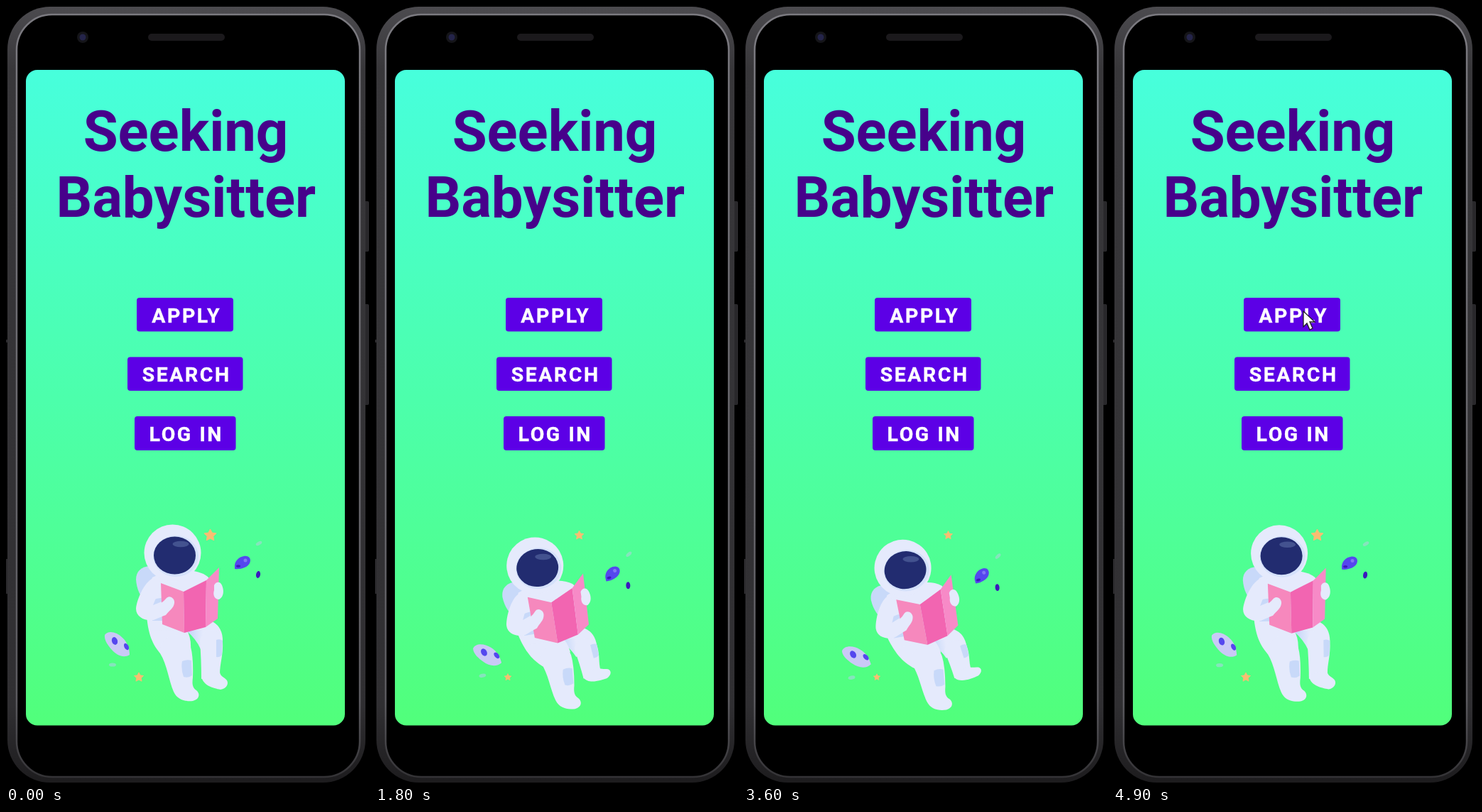
An HTML page that plays this animation: 511x1096 px, repeating every 5000 ms.

```html
<!DOCTYPE html>
<html lang="en">
<head>
<meta charset="utf-8">
<title>Seeking Babysitter</title>
<style>
  html, body { margin: 0; width: 100%; height: 100%; overflow: hidden; background: #000; }
  svg { display: block; width: 100vw; height: 100vh; }
  text { font-family: Roboto, sans-serif; font-weight: 700; text-anchor: middle; }
  .title { font-size: 79.6px; fill: #47018b; }
  .button rect { fill: #5c00e6; }
  .button text { font-size: 28.4px; letter-spacing: 2.6px; fill: #fff; stroke: #fff; stroke-width: .4px; }
  .suit { fill: #e5eafc; }
  .shade { fill: #c8d9f9; }
  .gold { fill: #f9bd72; }
  .violet { fill: #5547ee; }
  .deep { fill: #3c17bd; }
  .mist { fill: #86e4bd; }
</style>
</head>
<body>
<svg viewBox="0 0 511 1096" preserveAspectRatio="none">
  <defs>
    <linearGradient id="screen" x2="0" y2="1">
      <stop stop-color="#47ffdc"/>
      <stop offset="1" stop-color="#51ff7b"/>
    </linearGradient>
    <linearGradient id="rim" x2="0" y2="1">
      <stop stop-color="#4c4b4f"/>
      <stop offset=".08" stop-color="#38373a"/>
      <stop offset=".9" stop-color="#302f32"/>
      <stop offset="1" stop-color="#1d1c1e"/>
    </linearGradient>
    <linearGradient id="glow" x2="0" y2="1">
      <stop stop-color="#7b7a80"/>
      <stop offset=".9" stop-color="#5b5a5f"/>
      <stop offset="1" stop-color="#343336"/>
    </linearGradient>
    <linearGradient id="thighFill">
      <stop offset=".1" stop-color="#c8d9f9"/>
      <stop offset=".45" stop-color="#e5eafc"/>
    </linearGradient>
    <path id="star" d="M0-9L2.8-3.6 9-2.7 4.5 1.7 5.5 7.7 0 4.9-5.5 7.7-4.5 1.7-9-2.7-2.8-3.6Z"
      stroke="#f9bd72" stroke-linejoin="round"/>
  </defs>

  <!-- phone -->
  <g fill="#29282b">
    <rect x="504" y="275" width="7" height="71" rx="2"/>
    <rect x="504" y="420" width="7" height="142" rx="2"/>
    <rect x="0" y="470" width="4" height="4"/>
    <rect x="0" y="779" width="4" height="49"/>
  </g>
  <rect x="2" y="1" width="504" height="1093" rx="60" fill="url(#rim)"/>
  <rect x="15" y="12" width="483" height="1074" rx="50" fill="#000" stroke="url(#glow)" stroke-width="2.5"/>
  <circle cx="108" cy="44" r="8" fill="#151519"/>
  <circle cx="108" cy="44" r="4.5" fill="#24244a"/>
  <rect x="200" y="39" width="108" height="10" rx="5" fill="#1b191c"/>
  <rect x="28" y="90" width="449" height="923.5" rx="16" fill="url(#screen)"/>

  <text class="title" x="253" y="204">Seeking</text>
  <text class="title" x="253.3" y="297.2">Babysitter</text>
  <g class="button">
    <rect x="184" y="411" width="136" height="47.5" rx="4"/>
    <text x="254.2" y="446">APPLY</text>
    <rect x="171" y="494.5" width="162.5" height="47.5" rx="4"/>
    <text x="254.2" y="529.4">SEARCH</text>
    <rect x="181" y="578" width="142.5" height="48" rx="4"/>
    <text x="253.8" y="613">LOG IN</text>
  </g>

  <!-- floating bits -->
  <g transform="translate(287.5 745.5)"><use class="twinkle gold" href="#star"/></g>
  <g transform="translate(187 945.5) scale(.78)"><use class="twinkle gold" href="#star"/></g>
  <g transform="translate(156 899)"><g class="drift">
    <path fill="#cac9f6" d="M-17-13C-12-20 0-17 8-9C15-3 18 8 18 15C10 20 0 16-7 8C-12 2-18-5-17-13Z"/>
    <ellipse class="violet" cx="-3" cy="-4.5" rx="4" ry="5.5" transform="rotate(-18 -3 -4.5)"/>
    <ellipse class="violet" cx="13.5" cy="3.5" rx="3" ry="5" transform="rotate(-28 13.5 3.5)"/>
  </g></g>
  <g transform="translate(333 784)"><g class="drift">
    <path class="violet" d="M-11 7C-12-1-6-8 2-9C9-10 13-5 10 1C7 7-3 10-11 9Z"/>
    <circle cx="4" cy="-3" r="2.5" fill="#8177f5"/>
    <ellipse class="deep" cx="-6" cy="5" rx="3" ry="1.8"/>
  </g></g>
  <g transform="translate(356 757)"><g class="drift">
    <ellipse class="mist" rx="4.7" ry="2.4" transform="rotate(-30)"/>
  </g></g>
  <g transform="translate(150 928)"><g class="drift">
    <ellipse class="mist" rx="5" ry="2.6"/>
  </g></g>
  <g transform="translate(355 801)"><g class="drift">
    <ellipse class="deep" rx="3" ry="5" transform="rotate(10)"/>
  </g></g>

  <!-- astronaut -->
  <g id="body">
    <path fill="url(#thighFill)" d="M254 880L270 860 292 868Q305 876 305 894L274 906Q268 892 254 880Z"/>
    <g id="farShin">
      <path class="suit" d="M273 896Q275 920 275 948L301 942C301 925 306 915 305 895A16 16 0 0 0 273 896Z"/>
      <path class="shade" d="M296 893Q301 891 305 894L304 914Q301 918 296 917Z"/>
      <path id="farFoot" class="suit" d="M275 942C275 957 292 961 302 963C310 962 314 955 311 950C307 945 300 944 301 936Z"/>
    </g>
    <g id="thigh">
      <path class="suit" d="M198 858C200 885 206 899 217 912L260 905Q261 890 254 878L232 858Z"/>
      <g id="shin">
        <path class="suit" d="M217 912C227 928 229 950 236 966C241 977 251 980 263 979C272 977 274 969 268 964C262 960 262 954 263 946Q264 918 260 903A22 22 0 0 0 217 912Z"/>
        <path class="shade" d="M248 923Q255 920 261 922L262 943Q257 947 250 945Q246 934 248 923Z"/>
      </g>
    </g>
    <path class="shade" d="M210 790C193 787 183 795 183 808C184 822 189 832 198 841L220 812Z"/>
    <path class="suit" d="M206 805C224 796 266 789 284 804Q294 814 291 832L282 879 204 880Q199 858 201 820Z"/>
    <path class="shade" d="M204 838Q212 834 219 834L221 866 206 866Z"/>
    <path class="suit" d="M207 806C194 812 184 837 183 849C183 861 196 867 208 865L224 858 222 838 207 844 219 815Z"/>
    <path fill="#f688bd" d="M218 813L250 825 251 883 220 871Z"/>
    <path fill="#f265b1" d="M250 825L282 809 281 875 251 883Z"/>
    <path fill="#f78ac7" d="M282 809L300 791 298 863 281 875Z"/>
    <path class="shade" d="M219 844Q229 838 231 846L226 856 219 860Z"/>
    <path class="suit" d="M217 842Q223 838 226 834C231 829 238 835 237 841C236 849 229 852 225 858L214 862Z"/>
    <path class="suit" d="M293 816C296 810 302 811 304 816C307 823 307 832 300 836C293 836 291 829 293 823Z"/>
    <circle class="suit" cx="234.5" cy="770.5" r="40"/>
    <ellipse cx="239" cy="775" rx="32" ry="29" fill="#d5e1fb"/>
    <ellipse cx="237.5" cy="774" rx="29.5" ry="26.5" fill="#222c70"/>
    <ellipse id="glint" cx="246" cy="758" rx="11.5" ry="4.2" fill="#43528f"/>
  </g>

  <path id="cursor" d="M268 430V452L273 447 277 456 281 454 277 445H284Z" fill="#fff" stroke="#222" stroke-width="1.3"/>
</svg>
<script>
const LOOP = 5000, STEP = 100, TOP_AT = 300, CURSOR_AT = 4900;
const $ = id => document.getElementById(id);
const transform = (el, value) => el.setAttribute('transform', value);
const drifters = document.querySelectorAll('.drift');
const stars = document.querySelectorAll('.twinkle');

// turn a part about its joint, optionally foreshortening it
function bend(id, angle, x, y, length = 1) {
  transform($(id), `translate(${x} ${y}) rotate(${angle}) scale(1 ${length}) translate(${-x} ${-y})`);
}

function pose(time) {
  // one smooth fall and rise per loop, slightly past 0 and 1 at the ends
  const q = 0.5 - 0.538 * Math.cos((time - TOP_AT) / LOOP * 2 * Math.PI);

  transform($('body'), `translate(${-14 * q} ${27 * q}) rotate(${-12 * q} 234 770)`);
  bend('glint', 12 * q, 234, 770);
  bend('thigh', -16 * q, 225, 865);
  bend('shin', 25 * q, 238, 905);
  bend('farShin', -10 * q, 289, 893, 1 - 0.32 * q);
  bend('farFoot', -26 * q, 288, 944);

  for (const el of drifters) transform(el, `translate(${2 * q} ${23 * q}) rotate(${-18 * q})`);
  for (const el of stars) transform(el, `scale(${0.95 - 0.35 * q})`);
  $('cursor').style.display = time >= CURSOR_AT ? '' : 'none';
}

const start = performance.now();
function frame() {
  const time = (performance.now() - start) % LOOP;
  pose(Math.floor(time / STEP) * STEP);
  requestAnimationFrame(frame);
}
frame();
</script>
</body>
</html>
```
